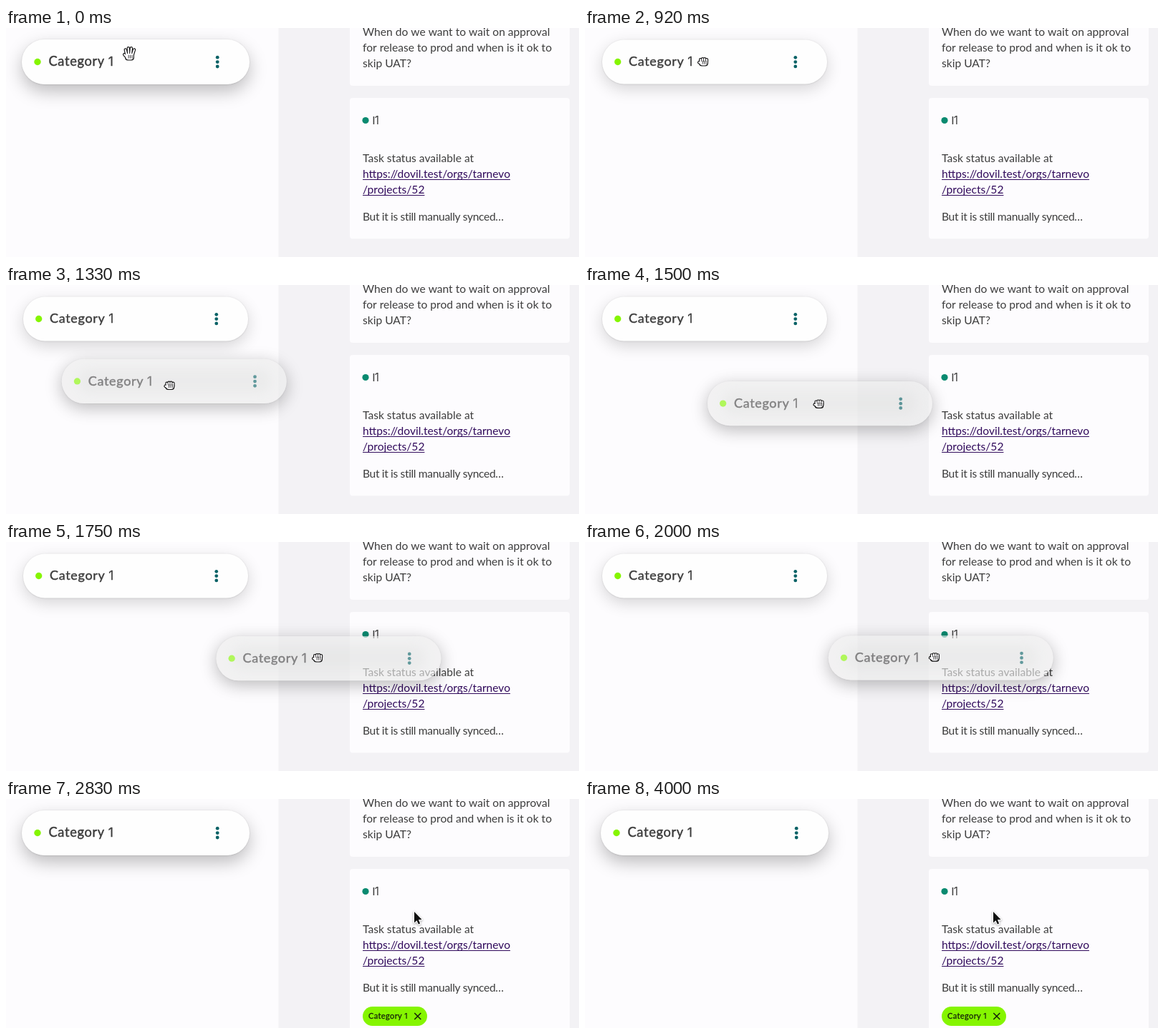
An HTML page with a canvas that plays this animation: 800x321 px, repeating every 4080 ms.

```html
<!DOCTYPE html>
<html lang="en">
<head>
<meta charset="utf-8">
<title>Drag a category onto a card</title>
<style>
  html, body { margin: 0; width: 100%; height: 100%; overflow: hidden; background: #f3f2f5; }
  canvas { display: block; width: 800px; height: 321px; }
</style>
</head>
<body>
<canvas id="stage" width="800" height="321"></canvas>
<script>
const W = 800, H = 321, LOOP = 4080, STEP = 1000 / 12;
const INK = '#3d3d3d', LINK = '#310b5c', LIME = '#85f500', TEAL = '#0a6266', PAPER = '#fdfcfe', BLACK = '#111';
const SANS = 'Lato, sans-serif', DIGIT = 'Inter, sans-serif';

// Moments, in steps of a twelfth of a second
const REACHED = 6, PRESS = 8, LIFT = 11.8, REST = 21, SETTLE = 28, DROP = 30, TAGGED = 32;
const LAG = 0.28;

const HOME = { x: 172, y: 36 }, GRAB = { x: 165, y: 47 }, BEND = { x: 190, y: 193 };
const PAUSE = { x: 435, y: 162 }, END = { x: 569, y: 160 };

const stage = document.getElementById('stage').getContext('2d');
const layer = document.createElement('canvas');
layer.width = W;
layer.height = H;
const layerCtx = layer.getContext('2d');

function ease(s, from, to) {
  const u = Math.min(1, Math.max(0, (s - from) / (to - from)));
  return u * u * (3 - 2 * u);
}

const mix = (a, b, q) => ({ x: a.x + (b.x - a.x) * q, y: a.y + (b.y - a.y) * q });

// Reach for the chip, swing it down in a bow, then slide it onto the card
function pointer(s) {
  if (s < LIFT) return mix(HOME, GRAB, ease(s, 0, REACHED));
  if (s > REST) return mix(PAUSE, END, ease(s, REST, SETTLE));
  const q = ease(s, LIFT, REST);
  return mix(mix(GRAB, BEND, q), mix(BEND, PAUSE, q), q);
}

function box(c, x, y, w, h, r, fill) {
  c.beginPath();
  c.roundRect(x, y, w, h, r);
  c.fillStyle = fill;
  c.fill();
}

function dot(c, x, y, r, fill) {
  c.beginPath();
  c.arc(x, y, r, 0, 2 * Math.PI);
  c.fillStyle = fill;
  c.fill();
}

function line(c, x1, y1, x2, y2) {
  c.beginPath();
  c.moveTo(x1, y1);
  c.lineTo(x2, y2);
  c.stroke();
}

function text(c, str, x, y, size, { color = INK, family = SANS, track = 0, bold = 0 } = {}) {
  c.font = `${size}px ${family}`;
  c.letterSpacing = track + 'px';
  c.fillStyle = c.strokeStyle = color;
  c.fillText(str, x, y);
  if (bold) {
    c.lineWidth = bold;
    c.lineJoin = 'round';
    c.strokeText(str, x, y);
  }
  return c.measureText(str).width;
}

function label(c, x, y, size, color) {
  const w = text(c, 'Category', x, y, size, { color, track: size * 0.036, bold: size * 0.024 });
  text(c, '1', x + w + size * 0.27, y, size * 0.96, { color, family: DIGIT, bold: size * 0.016 });
}

function shadow(c, alpha, blur, dy) {
  c.shadowColor = `rgba(0,0,0,${alpha})`;
  c.shadowBlur = blur;
  c.shadowOffsetY = dy;
}

// Category chip, centred on (181, 47.5); it shrinks a little while held
function category(c, dx, dy, held, dragged) {
  const k = held ? 0.9875 : 1;
  const body = fill => box(c, 22, 16, 318, 63, 31.5, fill);
  c.save();
  c.translate(181 + dx, 47.5 + dy);
  c.scale(k, k);
  c.translate(-181, -47.5);
  if (dragged) shadow(c, 0.42, 24, 6);
  else if (held) shadow(c, 0.16, 22, 7);
  else shadow(c, 0.25, 24, 10);
  const fill = dragged ? '#ececec' : '#fefefe';
  body(fill);
  shadow(c, 0.16, 2, 0.3);
  body(fill);
  shadow(c, 0, 0, 0);
  if (dragged) {
    c.filter = 'blur(7px)';
    box(c, 44, 29, 274, 36, 18, '#e2e3e2');
    c.filter = 'none';
  }
  dot(c, 44, 47.5, 4.7, LIME);
  label(c, 59.5, 53.4, 18.3, INK);
  for (let i = -1; i <= 1; i++) dot(c, 295.2, 47.6 + 6.4 * i, 2.4, TEAL);
  c.restore();
}

function ghost(s) {
  const p = pointer(s - LAG);
  layerCtx.clearRect(0, 0, W, H);
  category(layerCtx, p.x - GRAB.x + 0.8, p.y - GRAB.y + 0.5, true, true);
  stage.globalAlpha = 0.64;
  stage.drawImage(layer, 0, 0);
  stage.globalAlpha = 1;
}

// Four fanned fingers, a thumb and a palm: black outline first, white on top
function hand(c, { x, y }, open) {
  const reach = open ? 8 : 3.9, fan = open ? 1.45 : 1.05, palm = open ? 8.4 : 5.4;
  c.save();
  c.translate(x, y);
  c.lineCap = c.lineJoin = 'round';
  for (const [color, grow] of [[BLACK, 1.1], [PAPER, 0]]) {
    c.strokeStyle = color;
    c.lineWidth = 2.2 + 2 * grow;
    for (let i = 0; i < 4; i++) {
      const base = 2.8 * i - 3.6, droop = (i - 1.5) ** 2 * (open ? 1.1 : 0.5);
      line(c, base, 1.5, base * fan, droop - reach);
    }
    line(c, -2.5, palm - 2.5, open ? -6.8 : -5.8, 1.2);
    box(c, -4.8 - grow, -grow, 10.6 + 2 * grow, palm + 2 * grow, [1, 1, 4, 4], color);
  }
  c.strokeStyle = BLACK;
  c.lineWidth = 0.8;
  for (let i = 0; i < 3; i++) line(c, 2.4 * i - 0.8, palm - 6.2, 2.4 * i - 0.8, palm - 2.2);
  c.restore();
}

function arrow(c, x, y) {
  c.save();
  c.translate(x, y);
  const shape = new Path2D('M0 0V15.4L3.5 12.2 5.8 17.6 8.2 16.6 5.9 11.3 10.6 11Z');
  c.lineJoin = 'round';
  c.lineWidth = 2.4;
  c.strokeStyle = '#fff';
  shadow(c, 0.35, 3, 1);
  c.stroke(shape);
  shadow(c, 0, 0, 0);
  c.fillStyle = BLACK;
  c.fill(shape);
  c.restore();
}

function tag(c) {
  const color = '#15200a';
  box(c, 498, 291, 90, 27, 13.5, LIME);
  label(c, 506, 308, 11, color);
  c.strokeStyle = color;
  c.lineWidth = 1.5;
  for (const d of [-4.5, 4.5]) line(c, 574.8 - d, 300, 574.8 + d, 309);
}

function say(str, y, options) {
  return text(stage, str, 498, y, 15.6, options);
}

function link(str, y) {
  const w = say(str, y, { color: LINK });
  stage.fillRect(498, y + 2, w, 1);
}

function board(tagged) {
  const c = stage;
  c.fillStyle = '#f3f2f5';
  c.fillRect(0, 0, W, H);
  c.fillStyle = PAPER;
  c.fillRect(0, 0, 380.5, H);
  box(c, 480, -20, 307, 101, 4, PAPER);
  box(c, 480, 98, 307, tagged ? 240 : 197.5, 4, PAPER);

  say('When do we want to wait on approval', 10.5);
  say('for release to prod and when is it ok to', 32.7);
  say('skip UAT?', 54.8);
  dot(c, 502, 129.5, 4.6, '#0a8a70');
  text(c, 'I', 511.3, 134.8, 15.6);
  text(c, '1', 514.8, 134.8, 15.2, { family: DIGIT });
  say('Task status available at', 188);
  link('https://dovil.test/orgs/tarnevo', 210);
  link('/projects/52', 232);
  say('But it is still manually synced…', 270, { track: -0.35 });
  if (tagged) tag(c);
}

function draw(ms) {
  const s = Math.floor((ms % LOOP + 5) / STEP);
  board(s >= TAGGED);
  category(stage, 0, 0, s >= PRESS && s < DROP, false);
  if (s >= LIFT && s < DROP) ghost(s);
  if (s >= DROP) arrow(stage, 570, 158);
  else hand(stage, pointer(s), s < PRESS);
}

const start = performance.now();
function tick() {
  draw(performance.now() - start);
  requestAnimationFrame(tick);
}
tick();
</script>
</body>
</html>
```
